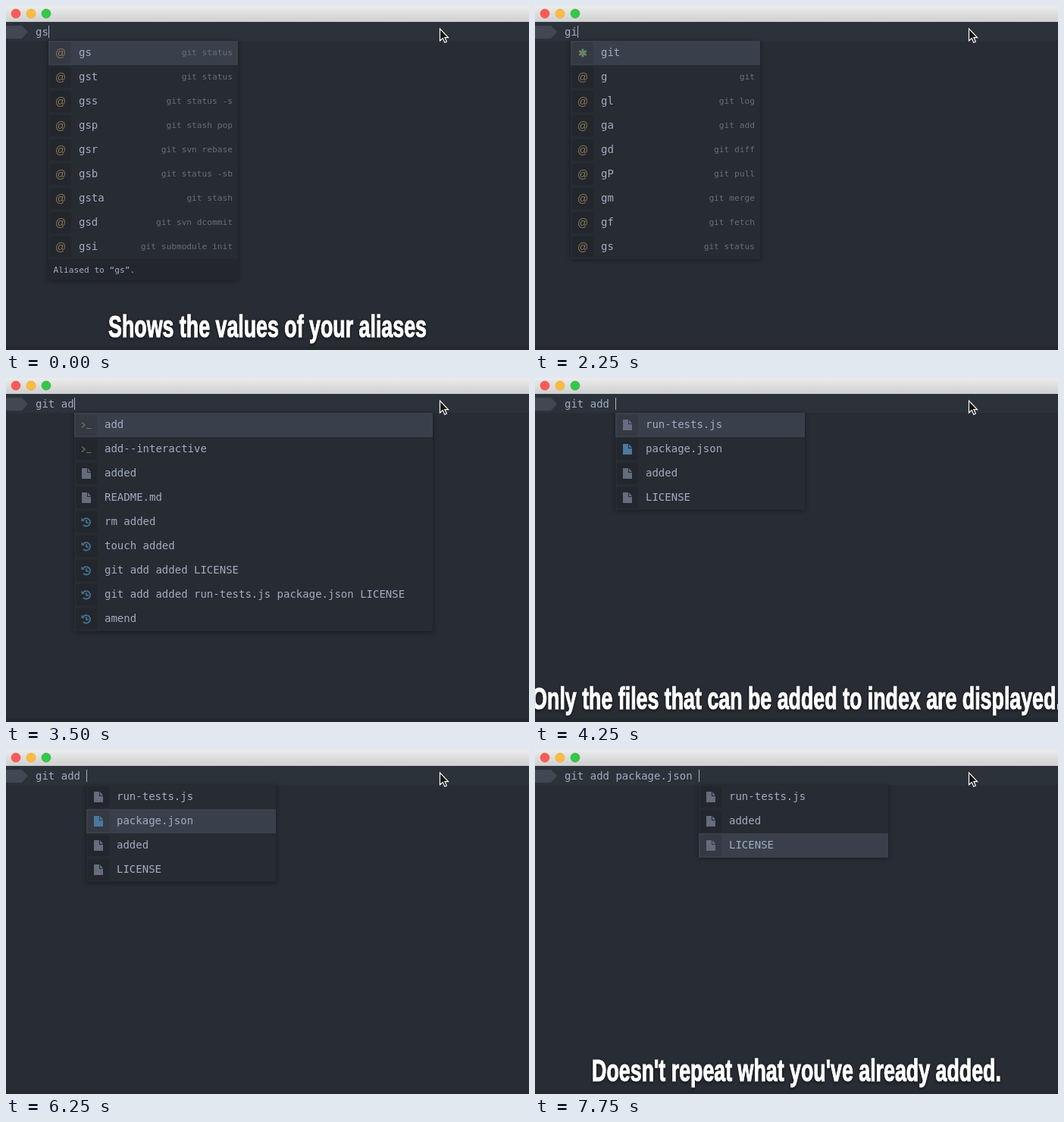
Recreate the animation shown at these times as an HTML page. Size 690 by 454 pixels, loop 8 s.

```html
<!DOCTYPE html>
<html lang="en">
<head>
<meta charset="utf-8">
<title>Terminal completion</title>
<style>
  html, body { margin: 0; width: 100%; height: 100%; overflow: hidden; background: #282c34; }
  svg { display: block; width: 690px; height: 454px; }
  text { white-space: pre; font: 14px "DejaVu Sans Mono", monospace; fill: #a1acc2; }
  .small { font-size: 11.2px; }
  .dim { fill: #686e7b; }
  .right { text-anchor: end; }
  .green { fill: #8fbc75; }
  .red { fill: #cf6675; }
  .at { font: 14px "Liberation Sans", sans-serif; fill: #8b7858; text-anchor: middle; }
  .shadow { filter: drop-shadow(0 1px 3px #0006); }
  .caption {
    font: bold 40px "Liberation Sans", sans-serif; text-anchor: middle;
    fill: #fff; stroke: #fff; stroke-width: 1.2px;
    filter: drop-shadow(0 1px 2px #000b);
  }
</style>
</head>
<body>
<svg viewBox="0 0 690 454">
  <defs>
    <linearGradient id="title" x2="0" y2="1">
      <stop stop-color="#ececec"/><stop offset="1" stop-color="#cfcfd0"/>
    </linearGradient>
  </defs>
  <rect width="690" height="454" fill="#282c34"/>
  <rect y="449" width="690" height="5" fill="#25292f"/>
  <g id="screen"></g>
  <rect width="690" height="21" fill="url(#title)"/>
  <g stroke-width=".6">
    <circle cx="13" cy="10" r="6" fill="#fc5b57" stroke="#df4744"/>
    <circle cx="33" cy="10" r="6" fill="#fdbc40" stroke="#de9f34"/>
    <circle cx="53" cy="10" r="6" fill="#34c84a" stroke="#27aa35"/>
  </g>
  <path d="M572.5 30v16l3.7-3.4 2.6 5.6 2.6-1.2-2.5-5.4h4.6z" fill="#111" stroke="#fff" stroke-width="1.2"/>
</svg>
<script>
const CHAR = 8.42, LOOP = 8000;
const screen = document.getElementById('screen');
const escapeText = s => s.replace(/&/g, '&amp;').replace(/</g, '&lt;');
const text = (x, y, s, cls = '') => `<text x="${x}" y="${y}" class="${cls}">${escapeText(s)}</text>`;

// Icons are drawn around the centre of their box.
const file = color => `<path d="M-6-7H1V-1H6V7H-6zM2-7L6-2H2z" fill="${color}"/>`;
const icons = {
  alias: '<text class="at" y="4.5">@</text>',
  command: '<path d="M0-5.5V5.5M-4.8-2.8L4.8 2.8M-4.8 2.8L4.8-2.8" stroke="#668568" stroke-width="2.8"/>',
  sub: '<path d="M-6-3.5L-2 0L-6 3.5M0 4.5H6.5" fill="none" stroke="#687a5d" stroke-width="1.2"/>',
  file: file('#646c7d'),
  changed: file('#4b789f'),
  history: `<g fill="none" stroke="#477295" stroke-width="1.8">
    <path d="M-4-3.2A5.2 5.2 0 1 1-4 3.8M0-2.8V.8H3"/><path d="M-6.5-5.5V-1H-2z" fill="#477295" stroke="none"/></g>`
};

// Item format: "icon|label|value"
const list = (icon, labels) => labels.split(',').map(label => `${icon}|${label}`);
const aliases = pairs => list('alias', pairs.replace(/=/g, '|'));

const gsItems = aliases('gs=git status,gst=git status,gss=git status -s,gsp=git stash pop,gsr=git svn rebase,gsb=git status -sb,gsta=git stash,gsd=git svn dcommit,gsi=git submodule init');
const giItems = ['command|git', ...aliases('g=git,gl=git log,ga=git add,gd=git diff,gP=git pull,gm=git merge,gf=git fetch,gs=git status')];
const addHistory = 'git add added LICENSE,git add added run-tests.js package.json LICENSE';
const gitItems = ['command|git', ...list('command', 'git-cvsserver,git-receive-pack,git-shell,git-upload-archive,git-upload-pack'),
  ...list('history', addHistory + ',git reset HEAD added run-tests.js package.json README.md LICENSE')];
const aItems = list('sub', 'add,add--interactive,am,annotate,apply,archive,archimport,amend,alias');
const adItems = [...list('sub', 'add,add--interactive'), ...list('file', 'added,README.md'),
  ...list('history', `rm added,touch added,${addHistory},amend`)];
const addItems = ['file|run-tests.js', 'changed|package.json', 'file|added', 'file|LICENSE'];
const restItems = list('file', 'run-tests.js,added,LICENSE');

const popup = (items, column, selected = 0, width = 250, note = '') => ({ items, column, selected, width, note });
const indexHint = 'Only the files that can be added to index are displayed.';
const repeatHint = "Doesn't repeat what you've already added.";
const picked = 'git add package.json ';

const scenes = [
  { at: 0, input: 'gs', menu: popup(gsItems, 2, 0, 250, 'Aliased to “gs”.'), caption: 'Shows the values of your aliases' },
  { at: 750, input: 'gs', output: true },
  { at: 1750, input: '' },
  { at: 2250, input: 'gi', menu: popup(giItems, 1) },
  { at: 2500, input: 'git', menu: popup(gitItems, 2, 0, 593) },
  { at: 2750, input: 'git ' },
  { at: 3000, input: 'git a' },
  { at: 3250, input: 'git a', menu: popup(aItems, 5) },
  { at: 3500, input: 'git ad', menu: popup(adItems, 6, 0, 473) },
  { at: 4000, input: 'git add ' },
  { at: 4250, input: 'git add ', menu: popup(addItems, 8), caption: indexHint },
  { at: 6000, input: 'git add ', menu: popup(addItems, 8, 1), caption: indexHint },
  { at: 6250, input: 'git add ', menu: popup(addItems, 8, 1) },
  { at: 6750, input: picked, menu: popup(restItems, 21, 0), caption: repeatHint },
  { at: 7250, input: picked, menu: popup(restItems, 21, 1), caption: repeatHint },
  { at: 7750, input: picked, menu: popup(restItems, 21, 2), caption: repeatHint }
];
const caretOff = [[500, 750], [1250, 1750], [4750, 5250], [5750, 6250], [7250, 7750]];

const status = `On branch master
Your branch is up-to-date with 'origin/master'.
Changes to be committed:
  (use "git reset HEAD <file>..." to unstage)

        modified:   LICENSE
        new file:   added
        deleted:    run-tests.js

Changes not staged for commit:
  (use "git add <file>..." to update what will be committed)
  (use "git checkout -- <file>..." to discard changes in working directory)

        modified:   package.json`.split('\n');

const columnX = n => Math.round(39 + n * CHAR);

function drawPrompt(y, input, caret) {
  return `<rect y="${y}" width="690" height="25" fill="#2c323a"/>
    <path d="M0 ${y + 5}H21L29 ${y + 13}L21 ${y + 22}H0z" fill="#404854"/>` +
    text(39, y + 18, input) +
    (caret ? `<rect x="${columnX(input.length)}" y="${y + 5}" width="1" height="16" fill="#a5b3cf"/>` : '');
}

function drawStatus() {
  return status.map((line, i) => {
    const color = !line.startsWith('        ') ? '' : i < 9 ? 'green' : 'red';
    return text(9, 69 + i * 18, line, color);
  }).join('');
}

function drawMenu({ items, column, selected, width, note }) {
  const x = columnX(column), bottom = 46 + items.length * 32;
  const rows = items.map((item, i) => {
    const [icon, label, value = ''] = item.split('|'), y = 46 + i * 32;
    return (i === selected ? `<rect x="${x}" y="${y}" width="${width}" height="32" fill="#3a404b"/>` : '') +
      `<rect x="${x + 2}" y="${y + 2}" width="28" height="28" rx="2" fill="#000" opacity=".1"/>
      <g transform="translate(${x + 16} ${y + 16})">${icons[icon]}</g>` +
      text(x + 40, y + 20, label) + text(x + 243, y + 19, value, 'small dim right');
  }).join('');
  return `<rect class="shadow" x="${x}" y="46" width="${width}" height="${bottom - 46 + (note ? 28 : 0)}" fill="#23272d"/>
    <rect x="${x}" y="46" width="${width}" height="${bottom - 46}" fill="#272b32"/>` +
    rows + text(x + 6.5, bottom + 18, note, 'small');
}

// All captions share one condensed style.
const drawCaption = s => `<g transform="translate(345 437) scale(.67 1)">${text(0, 0, s, 'caption')}</g>`;

let shown = '';
function draw(now) {
  const t = now % LOOP;
  const scene = scenes.findLast(s => s.at <= t);
  const caret = !caretOff.some(([from, to]) => t >= from && t < to);
  const key = scene.at + ':' + caret;
  if (key !== shown) {
    shown = key;
    const { input, output, menu, caption } = scene;
    screen.innerHTML = drawPrompt(21, input, caret && !output) +
      (output ? drawStatus() + drawPrompt(318, '', caret) : '') +
      (menu ? drawMenu(menu) : '') + (caption ? drawCaption(caption) : '');
  }
  requestAnimationFrame(draw);
}
draw(performance.now());
</script>
</body>
</html>
```
